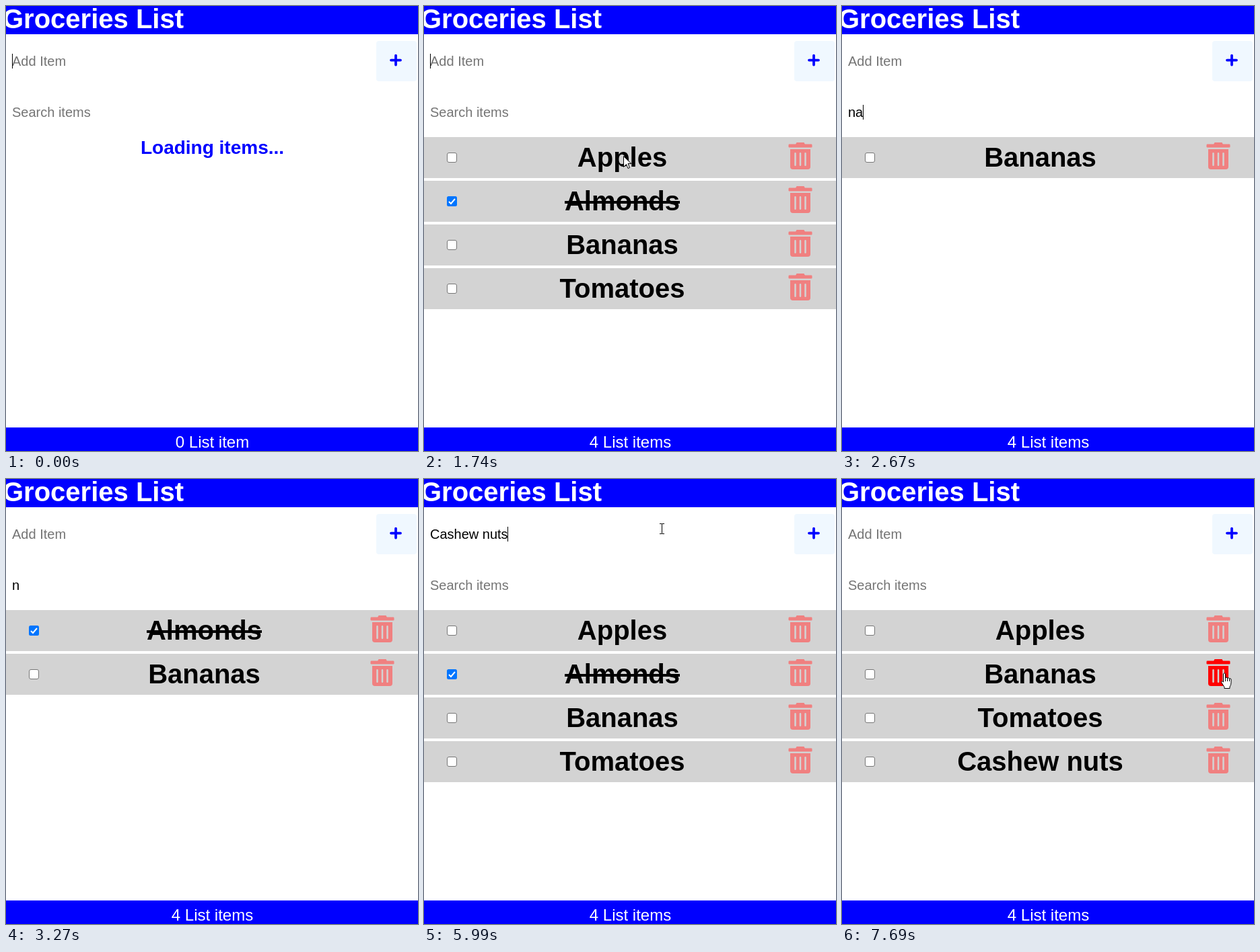
Animation of 612 by 662 pixels, one loop 8000 ms. Source, as an HTML page:

```html
<!DOCTYPE html>
<html lang="en">
<head>
<meta charset="utf-8">
<title>Groceries List</title>
<style>
  html, body { margin: 0; width: 100%; height: 100%; overflow: hidden; background: #fff; }
  svg { display: block; font-family: "Liberation Sans", Arial, sans-serif; }
  text { white-space: pre; }
  .bold { font-weight: bold; }
</style>
</head>
<body>
<svg width="612" height="662" viewBox="0 0 612 662">
  <defs>
    <g id="trash">
      <path d="M10.500 3l1.500-3h11l1.500 3z" stroke-linejoin="round"/>
      <rect y="2.5" width="35" height="5" rx="1.25"/>
      <path d="M2.500 10h30v26a4 4 0 0 1-4 4h-22a4 4 0 0 1-4-4z"/>
      <path d="M10 16.250v17.500m7.500 0v-17.500m7.500 0v17.500" stroke="#d3d3d3" stroke-width="2.5" stroke-linecap="round" fill="none"/>
    </g>
    <path id="arrow" d="M.5.5v16l4-4 2.500 6 2.500-1-2.500-6h5z" fill="#fff" stroke="#000"/>
    <path id="beam" d="M-3-7.500h3m1 0h3m-3.500 0v15m-3.500 0h3m1 0h3" fill="none" stroke="#000"/>
    <path id="hand" d="M-1.500 13V1q1.500-3 3 0v6q1.500-2 3 0 1.500-1 3 1 2-1 2.500 1v5q0 4-2 6v2.500h-8v-2l-4.500-7q0-3 3-.5zM1.500 7v5m3-5v5m3-4v4" fill="#fff" stroke="#000"/>
  </defs>
  <rect width="612" height="42" fill="#00f"/>
  <text class="bold" x="-5" y="33" font-size="40" fill="#fff">Groceries List</text>
  <rect x="550" y="52" width="60" height="60" rx="4" fill="#f0f8ff"/>
  <path d="M572 80.500h14m-7-7v14" stroke="#00f" stroke-width="3.75" stroke-linecap="round"/>
  <rect y="627" width="612" height="35" fill="#00f"/>
  <g id="view"></g>
</svg>
<script>
const LOOP = 8000, BLINK = 530, POINTER_STEP = 1000 / 15;
const ADDED = 4, REMOVED = 'Almonds', NEW_ITEM = 'Cashew nuts';
const view = document.getElementById('view');

// Key points of the pointer's way: [ms, x, y].
const pointerWay = [
  [1000, 583, 611], [1140, 470, 568], [1400, 465, 550], [1800, 262, 158],
  [3730, 330, 102], [3800, 353, 74], [6450, 353, 74], [6800, 592, 250],
  [7000, 567, 414], [7220, 568, 268], [7420, 568, 272], [7560, 568, 289]
];
// Which field has focus, and when its caret lights up.
const focusChanges = [
  { from: 0, field: 'add', lit: -460 },
  { from: 1870, field: 'search', lit: 1870 },
  { from: 2140, field: 'search', lit: 2140 },
  { from: 2670, field: 'search', lit: 2670 },
  { from: 3800, field: 'add', lit: 4260 },
  { from: 5990, field: 'add', lit: 5990 },
  { from: 7050, field: 'none', lit: 0 }
];

const clamp = (v, lo, hi) => Math.min(hi, Math.max(lo, v));
const measurer = document.createElement('canvas').getContext('2d');
measurer.font = '20px "Liberation Sans", Arial, sans-serif';

function pointerAt(t) {
  if (t < 1000 || (t >= 2140 && t < 3730)) return null;
  const now = Math.round(t / POINTER_STEP) * POINTER_STEP;
  const next = pointerWay.findIndex(p => p[0] > now);
  const [t1, x1, y1] = pointerWay.at(next < 0 ? -1 : next);
  const [t0, x0, y0] = pointerWay.at(next < 0 ? -1 : Math.max(0, next - 1));
  const k = t1 > t0 ? (now - t0) / (t1 - t0) : 1;
  return { x: Math.round(x0 + (x1 - x0) * k), y: Math.round(y0 + (y1 - y0) * k) };
}

// The first letter stands alone for a moment; the rest follow at an even pace.
function typedAt(t) {
  if (t < 4730 || t >= 6060) return '';
  return NEW_ITEM.slice(0, 1 + clamp(Math.ceil((t - 4980) / 111), 0, NEW_ITEM.length));
}

function queryAt(t) {
  if (t < 2140 || t >= 3400) return '';
  return t >= 2670 && t < 3270 ? 'na' : 'n';
}

function caretField(t) {
  const { field, lit } = focusChanges.findLast(f => f.from <= t);
  const on = typedAt(t) || Math.floor((t - lit) / BLINK) % 2 === 0;
  return on ? field : 'none';
}

function listAt(t) {
  if (t < 600) return [];
  const list = ['Apples', 'Almonds', 'Bananas', 'Tomatoes'];
  if (t >= 6060) list.push(NEW_ITEM);
  return t >= 7690 ? list.filter(name => name !== REMOVED) : list;
}

const label = (str, x, y, size, fill, extra = '') =>
  `<text x="${x}" y="${y}" font-size="${size}" fill="${fill}" ${extra}>${str}</text>`;

function field(value, hint, y, caret) {
  const x = 9 + Math.floor(measurer.measureText(value).width);
  return label(value || hint, 9, y + 18, 20, value ? '#000' : '#757575') +
    (caret ? `<rect x="${x}" y="${y}" width="1" height="22"/>` : '');
}

function checkbox(y, checked) {
  return checked
    ? `<rect x="34" y="${y}" width="15" height="15" rx="2.5" fill="#0075ff"/>
       <path d="M37 ${y + 8}l3 3 6-7" fill="none" stroke="#fff" stroke-width="2"/>`
    : `<rect x="34.5" y="${y + .5}" width="14" height="14" rx="2.5" fill="#fff" stroke="#767676"/>`;
}

const rowTop = i => 195 + 65 * i;
const overTrash = (p, i) =>
  p && Math.abs(p.x - 559) <= 18 && Math.abs(p.y - rowTop(i) - 28) <= 20;

function row(name, i, pointer) {
  const y = rowTop(i), done = name === REMOVED;
  return `<rect y="${y}" width="612" height="61" fill="#d3d3d3"/>` +
    checkbox(y + 23, done) +
    label(name, 294.5, y + 44, 40, '#000', 'class="bold" text-anchor="middle"') +
    (done ? `<rect x="209" y="${y + 30}" width="171" height="4"/>` : '') +
    `<use href="#trash" x="541.5" y="${y + 8}" fill="${overTrash(pointer, i) ? '#f00' : '#f08080'}"/>`;
}

function pointerShape(p, shown) {
  if (!p) return '';
  const onField = (p.x < 548 && p.y > 52 && p.y < 112) || (p.y > 128 && p.y < 188);
  const onTrash = shown.some((_, i) => overTrash(p, i));
  const shape = onField ? 'beam' : onTrash ? 'hand' : 'arrow';
  return `<use href="#${shape}" x="${p.x}" y="${p.y}"/>`;
}

function render(t) {
  const pointer = pointerAt(t), query = queryAt(t), caret = caretField(t);
  const list = listAt(t), shown = list.filter(name => name.includes(query));
  return field(typedAt(t), 'Add Item', 71, caret === 'add') +
    field(query, 'Search items', 147, caret === 'search') +
    (list.length
      ? shown.map((name, i) => row(name, i, pointer)).join('')
      : label('Loading items...', 306.5, 220, 28, '#00f', 'class="bold" text-anchor="middle"')) +
    label(`${list.length} List item${list.length ? 's' : ''}`, 306.5, 657, 24, '#fff', 'text-anchor="middle"') +
    pointerShape(pointer, shown);
}

let last = '';
const start = performance.now();
function tick() {
  const markup = render((performance.now() - start) % LOOP);
  if (markup !== last) view.innerHTML = last = markup;
  requestAnimationFrame(tick);
}
tick();
</script>
</body>
</html>
```
